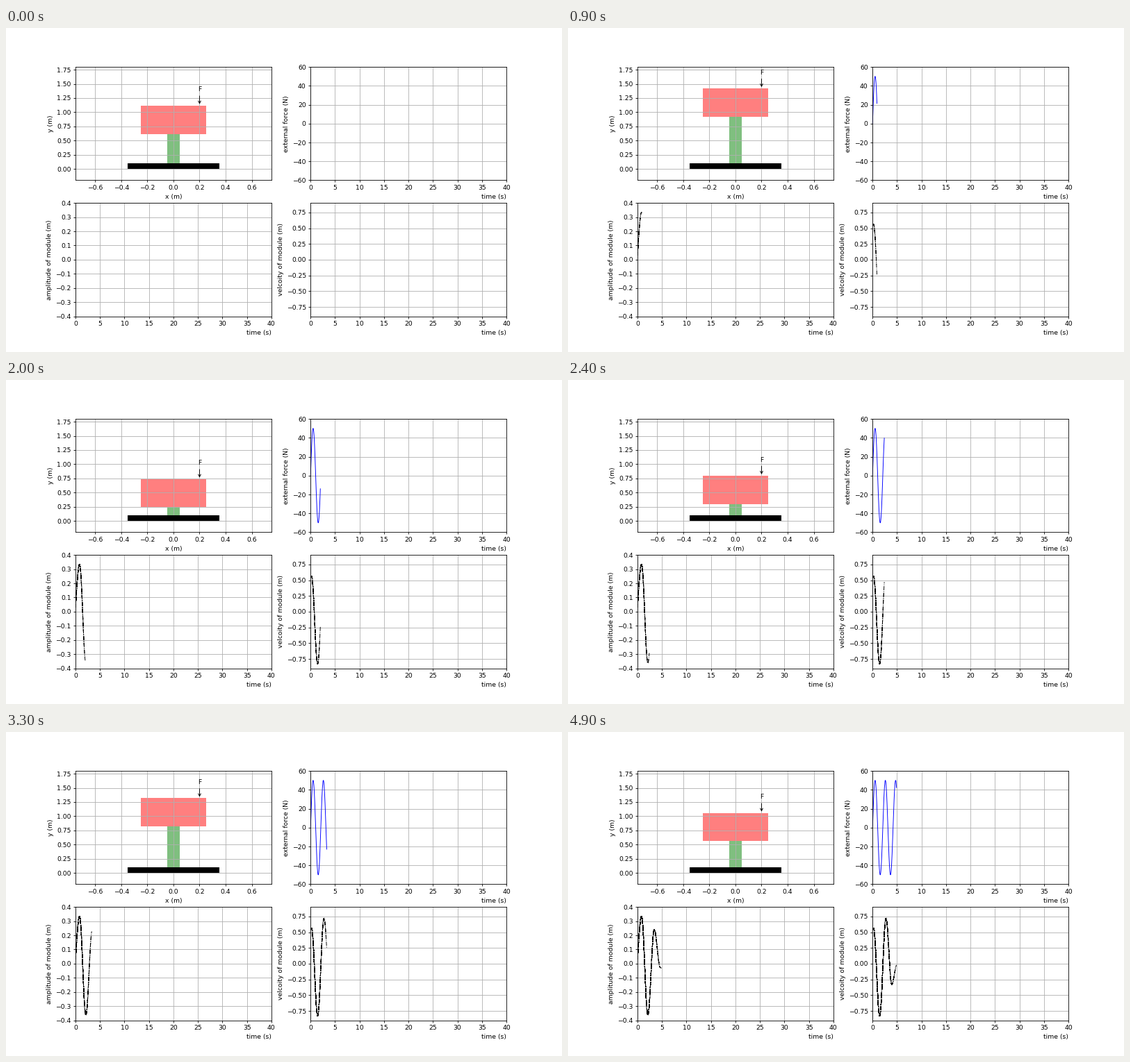
Write a matplotlib script that moves like this. It is 800 px wide and 467 px high and loops after 5000 ms.

```python
import numpy as np
import matplotlib.pyplot as plt
from matplotlib.animation import FuncAnimation
from matplotlib.patches import Rectangle

FRAMES = 50
INTERVAL = 100            # ms
STEPS = 5                 # samples per frame
SCALE = 2 / 3             # all point sizes relative to the defaults

plt.rcParams.update({
    "font.family": "DejaVu Sans",
    "font.size": 10 * SCALE,
    "axes.linewidth": 0.6,
    "axes.labelpad": 4 * SCALE,
    "grid.linewidth": 0.6,
    "grid.color": "#b0b0b0",
})
for tick in ("xtick", "ytick"):
    plt.rcParams.update({
        f"{tick}.major.size": 3.5 * SCALE,
        f"{tick}.major.pad": 3.5 * SCALE,
        f"{tick}.major.width": 0.6,
    })


def swing(t, turns):
    """Half-cosine motion through the turning points (time, value)."""
    times, values = np.array(turns).T
    i = np.clip(np.searchsorted(times, t, side="right") - 1, 0, len(times) - 2)
    s = (t - times[i]) / (times[i + 1] - times[i])
    return values[i] + (values[i + 1] - values[i]) * (1 - np.cos(np.pi * s)) / 2


time = np.arange(FRAMES * STEPS) * INTERVAL / 1000 / STEPS
force = 50 * np.sin(3 * time)
height = swing(time, [(-0.73, -0.221), (0.83, 0.335), (2.11, -0.362),
                      (3.42, 0.24), (4.66, -0.028), (5.1, -0.034)])
velocity = swing(time, [(0, 0.545), (0.22, 0.56), (1.45, -0.83),
                        (2.74, 0.72), (3.93, -0.33), (4.95, -0.02)])

fig = plt.figure(figsize=(8, 4.67), dpi=100, facecolor="white")
grid = fig.add_gridspec(2, 2, left=0.125, right=0.9, bottom=0.11, top=0.88,
                        wspace=0.2, hspace=0.2)


def make_axes(cell, xlim, ylim, xticks, yticks, ylabel):
    ax = fig.add_subplot(cell)
    ax.set(xlim=xlim, ylim=ylim, xticks=xticks, yticks=yticks)
    ax.set_xlim(xlim)
    ax.set_ylim(ylim)
    ax.set_ylabel(ylabel)
    ax.grid(True)
    return ax


def make_plot(cell, limit, yticks, ylabel):
    ax = make_axes(cell, (0, 40), (-limit, limit), range(0, 41, 5), yticks, ylabel)
    ax.set_xlabel("time (s)", loc="right")
    return ax


scene = make_axes(grid[0, 0], (-0.75, 0.75), (-0.2, 1.8),
                  np.linspace(-0.6, 0.6, 7), np.linspace(0, 1.75, 8), "y (m)")
scene.set_xlabel("x (m)")
force_ax = make_plot(grid[0, 1], 60, range(-60, 61, 20), "external force (N)")
height_ax = make_plot(grid[1, 0], 0.4, np.linspace(-0.4, 0.4, 9),
                      "amplitude of module (m)")
velocity_ax = make_plot(grid[1, 1], 0.9, np.linspace(-0.75, 0.75, 7),
                        "velcoity of module (m)")

BASE_TOP, REST, BOX = 0.1, 0.59, 0.5
scene.add_patch(Rectangle((-0.35, 0), 0.7, BASE_TOP, fc="black", lw=0, zorder=2))
column = scene.add_patch(Rectangle((-0.05, BASE_TOP), 0.1, 0.5, fc="green",
                                   alpha=0.5, lw=0))
module = scene.add_patch(Rectangle((-0.25, REST), 0.5, BOX, fc="red",
                                   alpha=0.5, lw=0))
arrow = scene.annotate("F", xy=(0.2, 1), xytext=(0.2, 1.25), ha="center",
                       arrowprops=dict(arrowstyle="->", lw=SCALE,
                                       shrinkA=2 * SCALE, shrinkB=2 * SCALE))

force_line, = force_ax.plot([], [], "b", lw=SCALE)


def make_trails(ax, values):
    """One stroke per frame; the strokes pile up and darken the older part."""
    return [ax.plot(time[:n * STEPS + 1], values[:n * STEPS + 1],
                    "k-.", lw=SCALE)[0] for n in range(FRAMES)]


trails = [make_trails(height_ax, height), make_trails(velocity_ax, velocity)]


def update(frame):
    now = frame * STEPS
    bottom = REST + height[now]
    column.set_height(bottom - BASE_TOP)
    module.set_y(bottom)
    arrow.xy = (0.2, bottom + BOX)
    arrow.set_position((0.2, bottom + BOX + 0.25))
    shown = now + 1 if frame else 0
    force_line.set_data(time[:shown], force[:shown])
    for strokes in trails:
        for n, stroke in enumerate(strokes):
            stroke.set_visible(0 < n <= frame)
    return []


animation = FuncAnimation(fig, update, frames=FRAMES, interval=INTERVAL,
                          init_func=lambda: update(0), repeat=True,
                          repeat_delay=0, blit=False)
plt.show()
```
